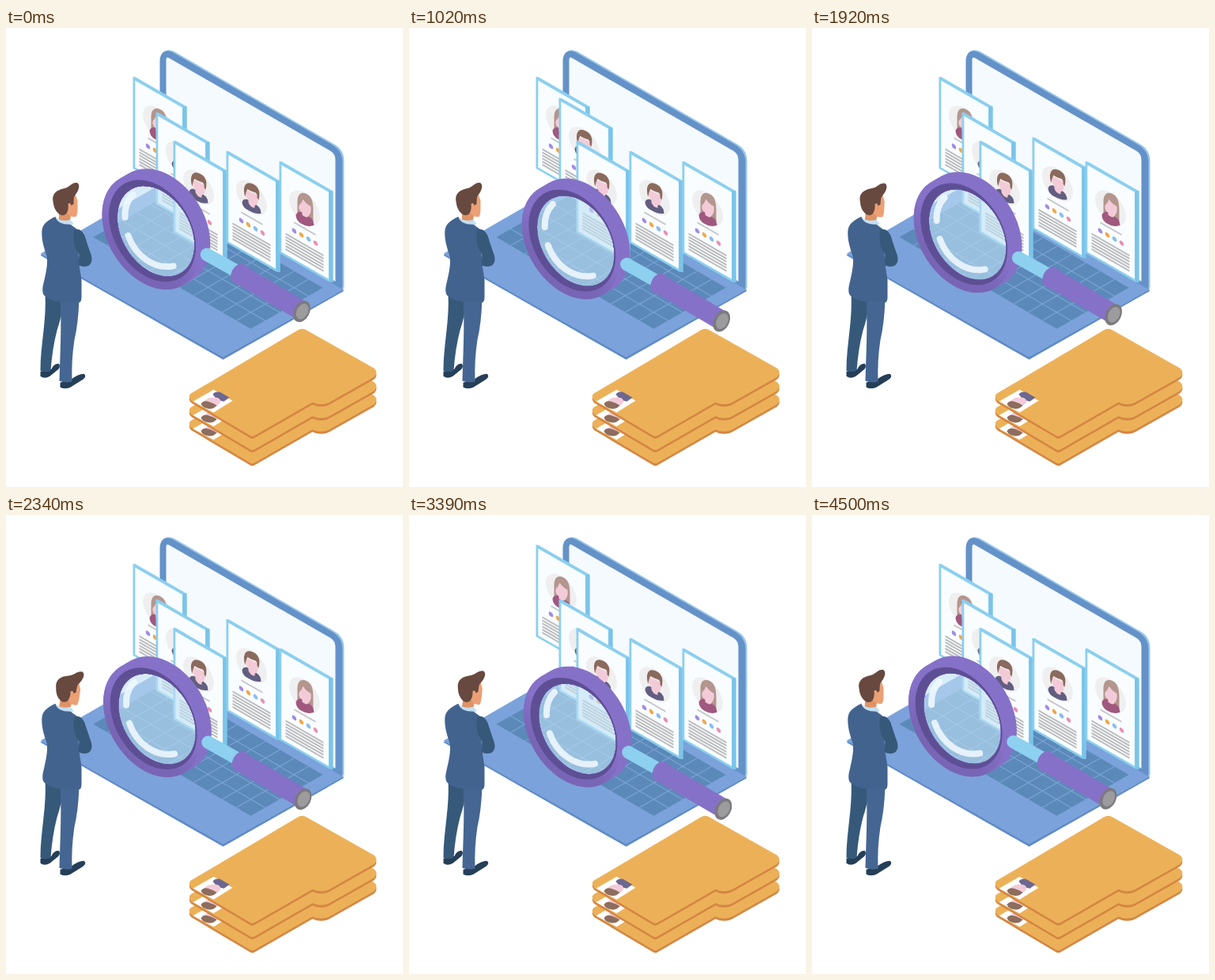
Animation of 502x581 px, one loop 4.53 s. Source, as an HTML page:

```html
<!DOCTYPE html>
<html lang="en">
<head>
<meta charset="utf-8">
<title>Candidate search</title>
<style>
html, body { margin: 0; width: 100%; height: 100%; overflow: hidden; background: #fff; }
svg { display: block; width: 502px; height: 581px; }
.shine { fill: none; stroke: #edf6fd; stroke-width: 8; stroke-linecap: round; opacity: .92; }
</style>
</head>
<body>
<svg viewBox="-0.5 -0.8 502 581" xmlns="http://www.w3.org/2000/svg">
  <defs>
    <linearGradient id="rim" x1=".75" y1=".2" x2=".3" y2=".95">
      <stop offset=".4" stop-color="#8671c8"/>
      <stop offset=".75" stop-color="#7865b5"/>
    </linearGradient>
    <g id="man">
      <path d="M-12 6Q-11 1-6 2L6 9Q12 13 12 20Q4 21-4 16Q-11 13-12 6Z" fill="#615e80"/>
      <path d="M-7-10L8-3Q9 5 7 8Q5 10 4 10L4 13Q-2 12-4 6V3Q-8-1-7-10Z" fill="#f3cbd8"/>
      <path d="M-8-1C-12-13-8-21 0-18C8-15 12-9 9 3L7 0Q8-6 3-7Q-3-9-5-11Q-7-8-8-1Z" fill="#8a6a5c"/>
    </g>
    <g id="woman">
      <path d="M-9 12V-8C-9-18-4-21 2-18C9-15 11-8 11 3V18Q2 19-9 12Z" fill="#b3968e"/>
      <path d="M-11 9Q-9 4-4 5L5 11Q11 13 12 22Q4 25-4 20Q-11 16-11 9Z" fill="#a0587f"/>
      <path d="M-7-3Q-3-7-2-11Q2-5 8-2Q9 7 5 10Q4 14-3 9V6Q-8 3-7-3Z" fill="#f3cbd8"/>
    </g>
    <path id="sheet" d="M233 462L368 382Q374 378 380 382L465 430Q471 435 465 441L412 471Q400 479 387 473L314 515Q311 517 308 515L234 471Q229 466 233 462Z"/>
    <g id="folder">
      <use href="#sheet" y="3" fill="#d58643"/>
      <use href="#sheet" fill="#ecb158"/>
      <path d="M236 472L262 457L286 471L262 486Z" fill="#fff"/>
      <path d="M261 463Q264 459 270 460L282 467L275 472Q266 471 261 463Z" fill="#6d6891"/>
      <path d="M250 473Q254 466 262 467Q270 466 271 472Q269 478 260 479Z" fill="#f3cbd8"/>
      <path d="M246 475Q249 470 255 472Q262 474 266 477Q262 482 255 481Q248 480 246 475Z" fill="#8d6d5e"/>
    </g>
  </defs>

  <!-- laptop -->
  <path d="M43 287L195 199L427 332L274 419Z" fill="#5d8ac6"/>
  <path d="M43 285L195 197L427 330L274 416Z" fill="#7ba2da"/>
  <path d="M110 264L201 212L400 328L309 380Z" fill="#5b89b9"/>
  <path id="keys" fill="none" stroke="#7ba5d6" stroke-width="1.1"/>
  <path d="M196 196V40C196 28 204 24 214 30L414 146Q427 153 427 168V329Z" fill="#94c5eb"/>
  <path d="M194 196V42C194 29 202 25 212 31L412 147Q425 155 425 169V330Z" fill="#6492c8"/>
  <path d="M202 198V40Q202 34 207 38L410 155Q416 159 416 166V320Z" fill="#f5faff"/>

  <g id="cards"></g>

  <!-- magnifier -->
  <g id="lens">
    <g id="ring"></g>
    <path d="M150 239Q149 221 160 210" class="shine"/>
    <path d="M154 262C163 288 187 305 211 300.500" class="shine"/>
    <path d="M253.500 286L298 311" stroke="#8dd0f0" stroke-width="16.500" stroke-linecap="round"/>
    <path d="M295 311L374 357.500" stroke="#8671c8" stroke-width="25"/>
    <ellipse cx="294.500" cy="310.500" rx="10" ry="13.500" transform="rotate(27 294.500 310.500)" fill="#8671c8"/>
    <ellipse cx="373.500" cy="358" rx="9.800" ry="14.300" transform="rotate(27 373.500 358)" fill="#7b7a7e"/>
    <ellipse cx="374.200" cy="358" rx="7" ry="10.500" transform="rotate(27 374.200 358)" fill="#9c9b9d"/>
  </g>

  <!-- folders -->
  <use href="#folder" y="34.500"/>
  <use href="#folder" y="17.500"/>
  <use href="#folder"/>

  <!-- man -->
  <path d="M43 434L57 431Q60 424 66 424Q69 427 66 431L55 440Q48 444 43 440Z" fill="#253f58"/>
  <path d="M68 448L82 444Q91 437 98 437Q102 440 97 444L81 454Q74 457 68 454Z" fill="#253f58"/>
  <path d="M49 335H74Q70 365 64 382Q58 405 56 433Q49 436 43 433C43 400 51 370 49 335Z" fill="#36597a"/>
  <path d="M68 342H92Q91 373 86 394Q82 420 83 447Q75 449 67 446C68 410 70 375 68 342Z" fill="#456692"/>
  <g id="head">
    <path d="M67 230L82 234L80 246L73 249L66 245Z" fill="#df9265"/>
    <path d="M76 210L87 209L90 218V227Q90 236 88 238Q83 239 79 236L73 228Z" fill="#eba075"/>
    <path d="M59 219C57 207 66 204 74 202C81 200 82 195 89 195C94 197 92 205 86 212Q85 214 85 222L82 224Q81 219 78 222Q79 229 76 234Q72 238 67 235Q60 230 59 219Z" fill="#67493f"/>
  </g>
  <path d="M63 239Q70 245 81 242L85 247L76 255L62 246Z" fill="#c3dff2"/>
  <path d="M62 238Q64 248 81 248L88 253Q94 266 91 285Q92 302 95 318V340Q95 347 91 347Q86 344 80 345Q59 348 48 338Q45 335 46 327C49 313 53 299 51 288C47 276 44 266 45 255Q46 245 62 238Z" fill="#43638f"/>
  <path d="M86 254Q94 252 99 262Q102 272 107 286Q110 296 104 300Q97 303 91 299L92 286Q84 276 85 262Z" fill="#36597a"/>
</svg>
<script>
const LOOP = 4530, SLOT = LOOP / 5, ISO = 0.577;
const TILT = 0.36, TALL = 1.116; // shape of the magnifier's circles
const $ = id => document.getElementById(id);
const clamp = v => Math.max(0, Math.min(1, v));

// x, y, portrait, turn in the raising order
const cards = [
  [160, 61, 'woman', 3], [189, 106, 'man', 1], [211, 142, 'man', 0],
  [278, 155, 'man', 2], [345, 168, 'woman', 4]
];

function cardArt(kind) {
  const dots = ['#a18ae6', '#f0a74a', '#88bdf0', '#e890b3'];
  let lines = '';
  for (let i = 0; i < 6; i++) lines += `M8 ${87 + i * 3.9}H56`;
  return `<g transform="matrix(1 ${ISO} 0 1 0 0)">
    <path d="M0 0L3-1.500H68V114L63 116H0Z" fill="#8bcfef"/>
    <path d="M63 1L68-1.500V114L63 116Z" fill="#7ac4e9"/>
    <path d="M2.800 3H62.500V113H2.800Z" fill="#f9fdff"/>
    <circle cx="32" cy="40.500" r="19.500" fill="#efeff0"/>
    <path d="M19 66.500H46" stroke="#c4c2c4" stroke-width="2"/>
    ${dots.map((c, i) => `<circle cx="${19 + i * 9}" cy="77" r="2.800" fill="${c}"/>`).join('')}
    <path d="${lines}" stroke="#bcbcbd" stroke-width="2.300"/></g>
    <use href="#${kind}" x="32" y="59"/>`;
}

// tilted circle of the magnifier, as an outline
function oval(x, y, r) {
  let d = '';
  for (let i = 0; i < 72; i++) {
    const a = i * Math.PI / 36, u = r * Math.cos(a), v = r * Math.sin(a);
    d += `${i ? 'L' : 'M'}${(x + u).toFixed(2)} ${(y + u * TILT + v * TALL).toFixed(2)}`;
  }
  return d + 'Z';
}

const shape = (d, fill, extra = '') =>
  `<path d="${d}" fill="${fill}" fill-rule="evenodd" ${extra}/>`;

function build() {
  $('cards').innerHTML = cards.map(c => `<g>${cardArt(c[2])}</g>`).join('');

  // keyboard grid: a runs along the long side, b along the short one
  const at = (a, b) => `${110 + 199 * a + 91 * b} ${264 + 116 * a - 52 * b}`;
  let d = '';
  for (let i = 1; i < 11; i++) d += `M${at(i / 11, 0)}L${at(i / 11, 1)}`;
  for (let i = 1; i < 5; i++) d += `M${at(0, i / 5)}L${at(1, i / 5)}`;
  $('keys').setAttribute('d', d);

  // glass, swept side of the rim, front band, dark inner wall
  const hole = oval(184.5, 256, 55), pane = oval(189, 256.5, 48.8);
  let side = '';
  for (let i = 0; i <= 8; i++)
    side += shape(oval(183 + i * 1.6, 257.5 - i * 0.94, 62) + pane, '#8671c8');
  $('ring').innerHTML = shape(pane, '#bfe1f4', 'opacity=".62"') + side +
    shape(oval(183, 257.5, 62) + hole, 'url(#rim)') + shape(hole + pane, '#5e4f95');
}

function draw(t) {
  cards.forEach(([x, y, , turn], i) => {
    const s = t - turn * SLOT;
    const lift = 24 * (clamp(s / 150) - clamp((s - 726) / 150));
    $('cards').children[i].setAttribute('transform', `translate(${x} ${y - lift})`);
  });

  const half = LOOP / 2, p = (t % half) / half;
  const dx = 23.6 * (1 - Math.abs(2 * p - 1));
  $('lens').setAttribute('transform', `translate(${dx} ${dx * ISO})`);

  const away = clamp(Math.abs(t - 3 * SLOT) / SLOT);
  $('head').setAttribute('transform', `rotate(${8.5 * (1 - away ** 3)} 74 245)`);
}

function tick() {
  draw(performance.now() % LOOP);
  requestAnimationFrame(tick);
}

build();
tick();
</script>
</body>
</html>
```
